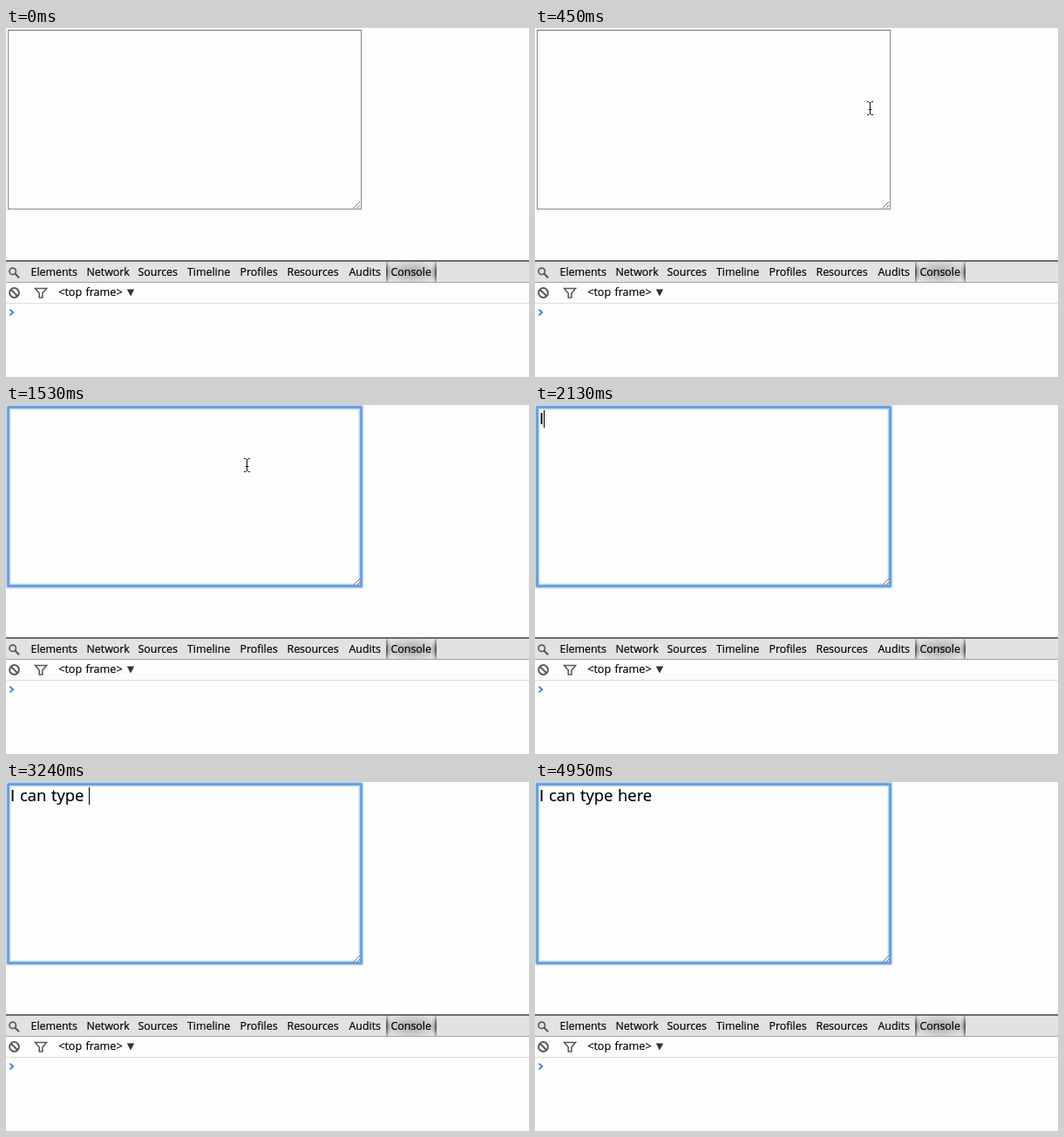
These frames come from a looping animation (600 by 400 pixels, 5.43 s). An HTML page with a canvas:

```html
<!DOCTYPE html>
<html lang="en">
<head>
<meta charset="utf-8">
<title>Typing in a text area</title>
<style>
html, body { margin: 0; width: 100%; height: 100%; overflow: hidden; background: #fdfdfd; }
canvas { display: block; }
</style>
</head>
<body>
<canvas id="stage" width="600" height="400"></canvas>
<script>
const ctx = document.getElementById('stage').getContext('2d');
const LOOP = 5430, TICK = 30;
const FONT = '"Open Sans", "Noto Sans", sans-serif';
const PAPER = '#fdfdfd', ICON = '#5a5a5a';
const MESSAGE = 'I can type here';
// time at which each character of the message appears
const KEYS = [2040, 2280, 2340, 2430, 2520, 2580, 2700, 2790, 2910, 3030, 3240, 3330, 3420, 3510, 3600];
const FOCUS = 1080;
const PATH = [[30, 604, 150], [450, 384, 92], [570, 338, 82], [720, 295, 73], [900, 276, 69]];
const TABS = [['Elements', 28.5], ['Network', 92.5], ['Sources', 151.5], ['Timeline', 208],
  ['Profiles', 268.5], ['Resources', 322.5], ['Audits', 393.5], ['Console', 441.5]];

function box(x, y, w, h, color) {
  ctx.fillStyle = color;
  ctx.fillRect(x, y, w, h);
}

function line(points, color, width) {
  ctx.beginPath();
  points.forEach(([x, y], i) => i ? ctx.lineTo(x, y) : ctx.moveTo(x, y));
  ctx.strokeStyle = color;
  ctx.lineWidth = width;
  ctx.stroke();
}

function ring(x, y, r, width) {
  ctx.beginPath();
  ctx.arc(x, y, r, 0, Math.PI * 2);
  ctx.strokeStyle = ICON;
  ctx.lineWidth = width;
  ctx.stroke();
}

function setFont(size) {
  ctx.font = size + 'px ' + FONT;
  ctx.wordSpacing = '1px';
}

function label(str, x, y, size) {
  setFont(size);
  ctx.fillStyle = ctx.strokeStyle = '#000';
  ctx.lineWidth = 0.2;
  ctx.fillText(str, x, y);
  ctx.strokeText(str, x, y);
}

function textArea(focused) {
  if (focused) {
    const glow = [[7, 0.13], [5, 0.28], [3, 0.6], [1.5, 0.7]];
    for (const [width, alpha] of glow) {
      ctx.strokeStyle = `rgba(84, 146, 214, ${alpha})`;
      ctx.lineWidth = width;
      ctx.lineJoin = 'round';
      ctx.strokeRect(2.5, 2.5, 405, 205);
    }
    ctx.lineJoin = 'miter';
  } else {
    ctx.strokeStyle = '#8a8a8a';
    ctx.lineWidth = 1;
    ctx.strokeRect(2.5, 2.5, 405, 205);
    box(2, 2, 406, 1, '#6e6e6e');
  }
  line([[398.5, 206.5], [406, 199]], '#777', 1);
  line([[402.5, 206.5], [406, 203]], '#777', 1);
}

function oval(x, y, rx, ry, color, alpha) {
  ctx.save();
  ctx.beginPath();
  ctx.rect(436, 268, 58, 23);
  ctx.clip();
  ctx.translate(x, y);
  ctx.scale(rx, ry);
  const g = ctx.createRadialGradient(0, 0, 0, 0, 0, 1);
  g.addColorStop(0, `rgba(${color}, ${alpha})`);
  g.addColorStop(1, `rgba(${color}, 0)`);
  box(-1, -1, 2, 2, g);
  ctx.restore();
}

function selectedTab() {
  oval(465, 280, 32, 14, '120,120,120', 0.55);
  for (const [edge, side] of [[436.5, 1], [493.5, -1]]) {
    oval(edge, 280, 6, 14, '70,70,70', 0.5);
    oval(edge + side * 0.5, 280, 1.6, 15, '40,40,40', 0.75);
  }
}

function devTools() {
  box(0, 266, 600, 2, '#6c6c6c');
  box(0, 268, 600, 23, '#e3e1e3');
  box(0, 291, 600, 1, '#a3a3a3');
  box(0, 315, 600, 1, '#dedede');
  selectedTab();
  for (const [name, x] of TABS) label(name, x, 284, 12.4);

  ring(7.7, 278.8, 3.7, 1.7);
  line([[10.4, 281.5], [15, 286.2]], ICON, 2.2);

  ring(9.5, 303.5, 5.4, 2);
  line([[5.7, 299.7], [13.3, 307.3]], ICON, 2);

  ctx.beginPath();
  [[33.5, 298.5], [46.5, 298.5], [41.8, 304], [41.8, 309], [38.2, 309], [38.2, 304]]
    .forEach(([x, y]) => ctx.lineTo(x, y));
  ctx.closePath();
  ctx.strokeStyle = ICON;
  ctx.lineWidth = 1.6;
  ctx.stroke();

  label('<top frame>', 60.2, 307, 12.6);
  ctx.beginPath();
  ctx.moveTo(138.8, 299.5);
  ctx.lineTo(147.2, 299.5);
  ctx.lineTo(143, 307.5);
  ctx.fillStyle = '#333';
  ctx.fill();

  line([[4.4, 322.6], [8.2, 326], [4.4, 329.4]], '#3d7edb', 1.8);
}

function beam(x, y) {
  ctx.save();
  ctx.translate(Math.round(x) + 0.5, Math.round(y));
  for (const s of [-1, 1]) {
    line([[-3.5, s * 7.5], [-1.5, s * 7.5], [0, s * 6], [1.5, s * 7.5], [3.5, s * 7.5]], '#222', 1);
  }
  line([[0, -6], [0, 6]], '#222', 1.2);
  line([[-2, 1.5], [2, 1.5]], '#222', 1);
  ctx.restore();
}

function arrow(x, y) {
  ctx.save();
  ctx.translate(Math.round(x), Math.round(y));
  ctx.beginPath();
  [[0, 0], [0, 14], [3.2, 11], [5.4, 16], [7.6, 15], [5.4, 10.2], [10, 10.2]]
    .forEach(([px, py]) => ctx.lineTo(px, py));
  ctx.closePath();
  ctx.strokeStyle = '#fff';
  ctx.lineWidth = 2;
  ctx.stroke();
  ctx.fillStyle = '#000';
  ctx.fill();
  ctx.restore();
}

function pointer(t) {
  if (t < PATH[0][0] || t >= KEYS[0]) return;
  let pos = PATH[PATH.length - 1].slice(1);
  for (let i = 1; i < PATH.length; i++) {
    const [t0, x0, y0] = PATH[i - 1], [t1, x1, y1] = PATH[i];
    if (t >= t0 && t < t1) {
      const k = (t - t0) / (t1 - t0);
      pos = [x0 + (x1 - x0) * k, y0 + (y1 - y0) * k];
    }
  }
  (pos[0] > 408 ? arrow : beam)(...pos);
}

function caretOn(t) {
  return (t >= FOCUS && t < 1500) || (t >= 1980 && t < 4050) || (t >= 4470 && t < 4950);
}

function typing(t) {
  const typed = MESSAGE.slice(0, KEYS.filter(k => k <= t).length);
  label(typed, 5, 22, 18.4);
  if (caretOn(t)) box(Math.floor(5 + ctx.measureText(typed).width), 6, 1, 20, '#000');
}

function draw(now) {
  const t = Math.floor((now % LOOP) / TICK) * TICK;
  box(0, 0, 600, 400, PAPER);
  textArea(t >= FOCUS);
  devTools();
  typing(t);
  pointer(t);
}

const start = performance.now();
function loop() {
  draw(performance.now() - start);
  requestAnimationFrame(loop);
}
loop();
</script>
</body>
</html>
```
